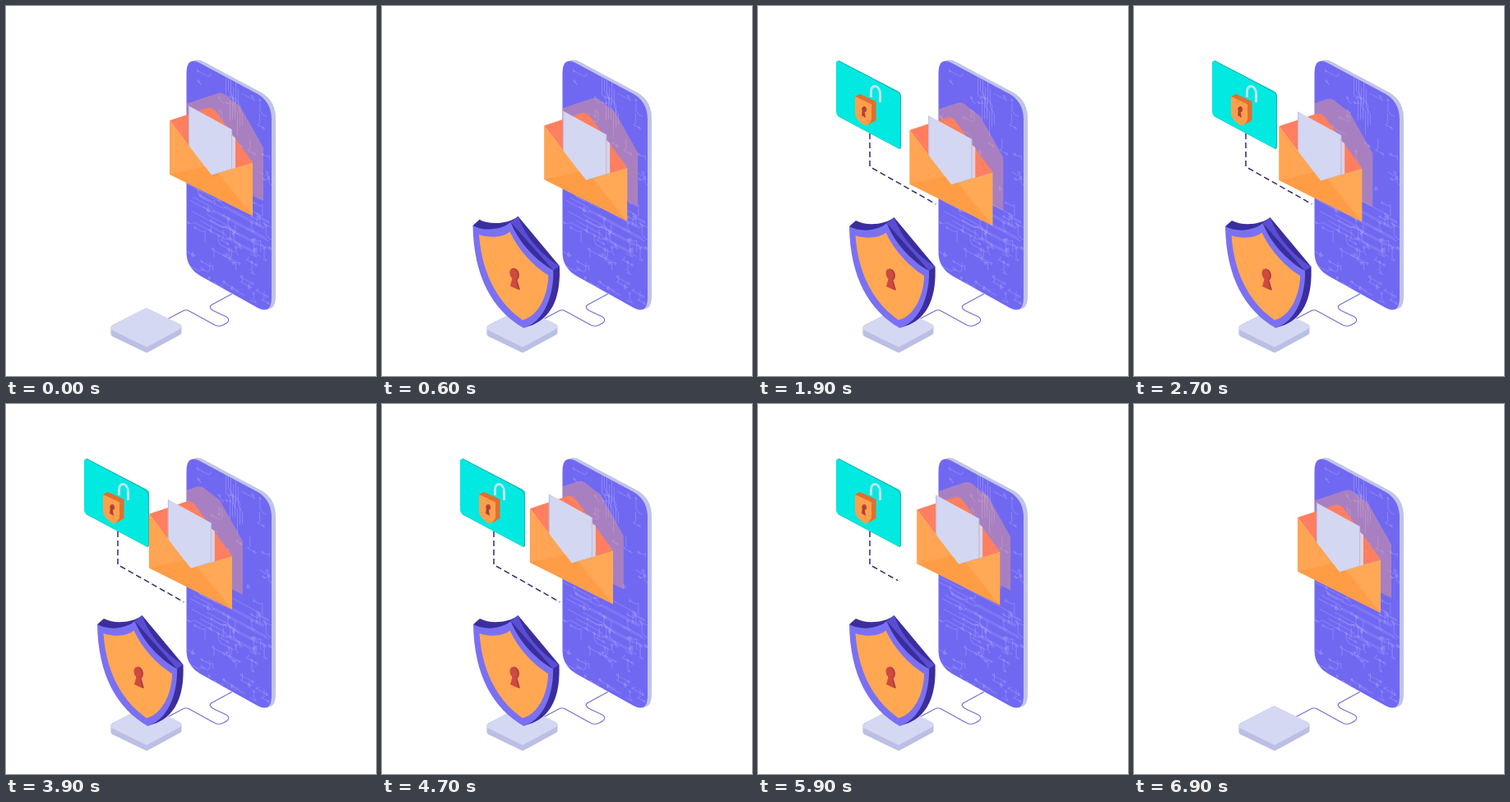
Animation, 450 px wide and 450 px high, one loop 7000 ms. Source, as an HTML page:

```html
<!DOCTYPE html>
<html lang="en">
<head>
<meta charset="utf-8">
<title>Secure mail</title>
<style>
  html, body { margin: 0; width: 100%; height: 100%; overflow: hidden; background: #fff; }
  svg { display: block; width: 100%; height: 100%; }
</style>
</head>
<body>
<svg viewBox="0 0 450 450">
  <defs>
    <path id="slab" d="M219.5 82Q219.5 61 236 69.500L306 107Q323 117 323 138V354Q323 376 306 367L236 328Q219.5 318 219.5 300Z"/>
    <clipPath id="screen"><use href="#slab"/></clipPath>
    <path id="route" d="M136 155V195.500L216.500 241"/>
    <mask id="reveal" maskUnits="userSpaceOnUse" x="0" y="0" width="450" height="450">
      <use id="wipe" href="#route" fill="none" stroke="#fff" stroke-width="8"/>
    </mask>
  </defs>

  <!-- platform and cable -->
  <path d="M196 381L216 370.500Q219 369 222 370.500L252 387Q258 391 264 388Q275 383 268 378L252 370.500Q245 366 251 363L275 350" fill="none" stroke="#736ad6" stroke-width="1.100"/>
  <g stroke-width="6" stroke-linejoin="round">
    <path d="M130.500 391L170.500 370.500L210.500 390V397L171 418.500L130.500 399Z" fill="#bbbfe3" stroke="#bbbfe3"/>
    <path d="M130.500 391.500L170.500 370.500L210.500 390L171 411.500Z" fill="#d4d8f2" stroke="#d4d8f2"/>
  </g>

  <!-- phone -->
  <use href="#slab" x="5" y="-1.5" fill="#c0c4e8"/>
  <use href="#slab" x="2.500" y="-.7" fill="#c0c4e8"/>
  <use href="#slab" fill="#7168f2"/>
  <g clip-path="url(#screen)">
    <path id="circuit" transform="matrix(1 .54 0 1 219.5 62)" fill="none" stroke="#c4c0ff" stroke-width=".6" opacity=".45"/>
    <path id="shadow" d="M199 139L244 124Q251 122 256 128L272 140L300 190V255L199 204Z" fill="#f0a080" opacity=".43"/>
  </g>

  <!-- dashed link and lock card -->
  <g mask="url(#reveal)">
    <use href="#route" fill="none" stroke="#352968" stroke-width="1.500" stroke-dasharray="7 4"/>
  </g>
  <g id="card">
    <path d="M98 66L171 104Q174 106 174 109V171Q174 175 171 173.500L97 134Z" fill="#16b3ad"/>
    <path d="M95 70Q95 65 99 67.500L170 105Q173 107 173 110V170Q173 174 169.500 172.500L98 134Q95 132 95 129Z" fill="#02e9e1"/>
    <path d="M137.500 111V104C137.500 94 148.500 96 148.500 107V117" fill="none" stroke="#c2e6f0" stroke-width="3"/>
    <path d="M118 110L124 107L143.500 116V139L137 143L129 145Z" fill="#e0702f"/>
    <path d="M118 110L138 119.500V138Q135 146 129 145Q118 137 118 131Z" fill="#ff9f4c"/>
    <path d="M126 133L126.800 127.500A2.800 3.500 0 1 1 129.800 129L131 136Z" fill="#b0403c"/>
  </g>

  <!-- envelope -->
  <g id="mail">
    <path d="M199 139L244 124Q250 122 255 128L300 190L250 206Z" fill="#ff7f60"/>
    <path d="M275 157L279 160V203H275Z" fill="#dcd3e8"/>
    <path d="M222 121L275 150V205L250 210L222 180Z" fill="#d3d7f1"/>
    <path d="M222.600 121.500V178L250 205.500L274.500 198V150" fill="none" stroke="#b9bee4" stroke-width="1"/>
    <path d="M199 139L250 205.500L300 190.500V255L199 204.500Z" fill="#ffa553"/>
    <path d="M199 204.500L242 195L250 205.500L258 203L300 255Z" fill="#ff9d47"/>
    <path d="M250 205.500L300 190.500V255L258 203Z" fill="#ffa957"/>
  </g>

  <!-- shield -->
  <g id="shield">
    <path d="M111 268L119 261C132 268 155 266 165.500 257L215.500 317C217 350 209 377 183 388L172 391.500Z" fill="#3a2e9e"/>
    <path d="M156.500 264L165.500 257C175 284 197 306 215.500 317L208 322Z" fill="#594ed0"/>
    <path d="M111 268C125 276 147 273 156.500 264C167 290 189 312 208 322C209 350 198 384 172 391.500C135 370 112 330 111 268Z" fill="#7a70f2"/>
    <path d="M118.500 279C130 283 147 283 155.500 275.500C166 298 184 317 202 328C202 350 191 377 171 382C146 365 122 332 118.500 279Z" fill="#ffa753"/>
    <path d="M157 341L159.500 332C154 328 155 319 160.500 319.500C167 320 169 331 164.500 333.500L168 346Z" fill="#a83a40"/>
    <path d="M156 341L158.500 332C154 327 155 319 160 320C165 321 167 331 163 333L165.500 345.500Z" fill="#cf4940"/>
  </g>
</svg>

<script>
const LOOP = 7000, STEP = 100;
const $ = id => document.getElementById(id);

// Circuit traces: long buses, then short branches ending in rings
function traces() {
  let seed = 11, d = '';
  const rnd = (lo, hi) => {
    seed = (seed * 16807) % 2147483647;
    return +(lo + (hi - lo) * seed / 2147483647).toFixed(1);
  };
  const ring = (x, y) => `M${x - 1.2} ${y}a1.2 1.2 0 1 1 2.4 0a1.2 1.2 0 1 1 -2.4 0`;
  for (let i = 0; i < 9; i++) {
    const y = 148 + i * 6, x = rnd(0, 30), run = rnd(15, 45);
    d += `M${x} ${y}h${run}l4 ${i % 2 ? 4 : -4}H${rnd(85, 106)}`;
  }
  for (let i = 0; i < 6; i++) {
    d += `M${48 + i * 3} ${rnd(-12, 6)}v${rnd(18, 35)}l5 5v${rnd(10, 30)}`;
  }
  for (let i = 0; i < 75; i++) {
    const x = rnd(2, 102), y = i % 3 ? rnd(140, 258) : rnd(4, 140);
    const run = rnd(-16, 16), rise = rnd(-14, 14);
    d += ring(x, y) + (i % 2
      ? `M${x} ${y}v${rise}l3 3h${run}`
      : `M${x} ${y}h${run}l3 -3v${rise}`);
  }
  return d;
}
$('circuit').setAttribute('d', traces());

const part = (t, from, to) => Math.min(1, Math.max(0, (t - from) / (to - from)));
const backOut = p => 1 + 2.3 * (p - 1) ** 3 + 1.3 * (p - 1) ** 2;
const pop = (t, inA, inB, outA, outB) =>
  t < outA ? backOut(part(t, inA, inB)) : 1 - part(t, outA, outB) ** 3;

const move = (id, x, y) => $(id).setAttribute('transform', `translate(${x} ${y})`);
function scale(id, k, x, y) {
  $(id).setAttribute('transform', `translate(${x} ${y}) scale(${k}) translate(${-x} ${-y})`);
  $(id).style.display = k > 0.001 ? '' : 'none';
}

const routeLength = $('route').getTotalLength();

function draw(t) {
  const a = 2 * Math.PI * t / LOOP;
  const x = 13 * (Math.cos(a) - 1), y = 12.5 * Math.sin(a + 0.05) - 0.4;
  move('mail', x, y);
  move('shadow', x + 13, y - 18);

  scale('shield', pop(t, 100, 650, 6350, 6850), 170, 391);
  scale('card', pop(t, 1120, 1570, 6050, 6650), 137, 152);

  const start = routeLength * (1 - part(t, 650, 1120));
  const end = routeLength * (1 - part(t, 5700, 6200));
  const shown = Math.max(0, end - start);
  $('wipe').setAttribute('stroke-dasharray', `0 ${start} ${shown} 999`);
}

const begin = performance.now();
function tick() {
  const t = (performance.now() - begin) % LOOP;
  draw(Math.floor(t / STEP) * STEP);
  requestAnimationFrame(tick);
}
draw(0);
requestAnimationFrame(tick);
</script>
</body>
</html>
```
